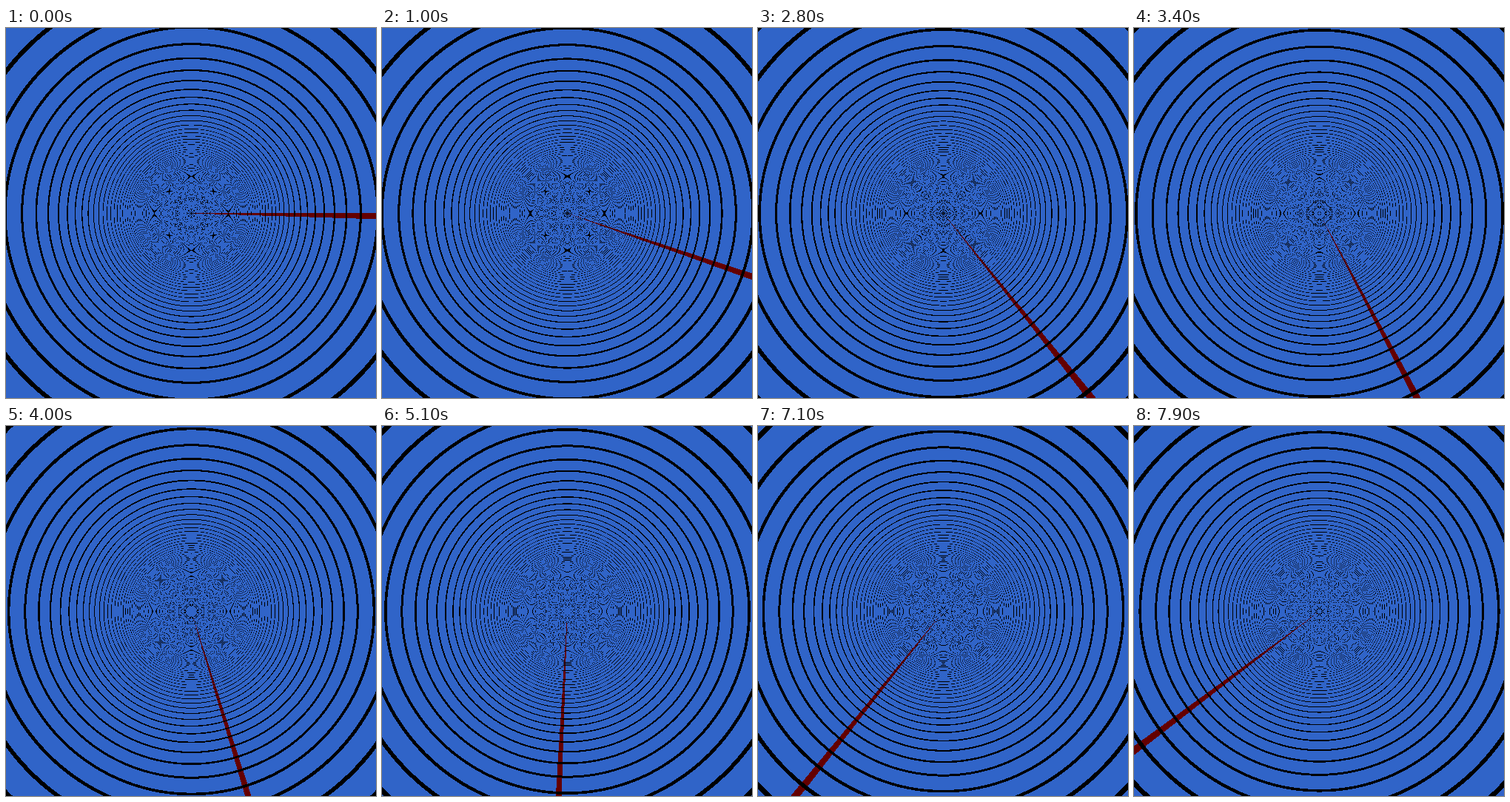
Write an HTML page with a canvas that moves like this. It is 500x500 px and loops after 8000 ms.

```html
<!DOCTYPE html>
<html lang="en">
<head>
<meta charset="utf-8">
<title>Shrinking rings</title>
<style>
  html, body { margin: 0; width: 100%; height: 100%; overflow: hidden; background: #3064c8; }
  canvas { display: block; width: 100vw; height: 100vh; image-rendering: pixelated; }
</style>
</head>
<body>
<canvas id="stage" width="500" height="500"></canvas>
<script>
const SIZE = 500, MID = SIZE / 2;
const STEP_MS = 100, STEPS = 80, TURN = 200; // TURN: steps in one full turn
const RING_SCALE = 2500, RING_WIDTH = 0.15;

const rgb = (r, g, b) => (255 << 24 | b << 16 | g << 8 | r) >>> 0;
const BLUE = rgb(48, 100, 200), RED = rgb(100, 0, 0), BLACK = rgb(0, 0, 0);

const ctx = document.getElementById('stage').getContext('2d');
const image = ctx.createImageData(SIZE, SIZE);
const pixels = new Uint32Array(image.data.buffer);

// Ring phase and angular sector of every pixel
const phase = new Float64Array(SIZE * SIZE);
const sector = new Uint8Array(SIZE * SIZE);
for (let y = 0, i = 0; y < SIZE; y++) {
  for (let x = 0; x < SIZE; x++, i++) {
    const dx = x - MID, dy = y - MID;
    const turn = Math.atan2(dy, dx) / (2 * Math.PI);
    phase[i] = RING_SCALE / (Math.hypot(dx, dy) || 1);
    sector[i] = Math.floor((turn < 0 ? turn + 1 : turn) * TURN);
  }
}

function draw(step) {
  const shift = step / TURN + 1e-9;
  for (let i = 0; i < pixels.length; i++) {
    const d = shift - phase[i];
    if (d - Math.floor(d) < RING_WIDTH) pixels[i] = BLACK;
    else pixels[i] = sector[i] === step ? RED : BLUE;
  }
  ctx.putImageData(image, 0, 0);
}

const start = performance.now();
let shown = -1;
function tick() {
  const step = Math.floor((performance.now() - start) / STEP_MS) % STEPS;
  if (step !== shown) draw(shown = step);
  requestAnimationFrame(tick);
}
tick();
</script>
</body>
</html>
```
